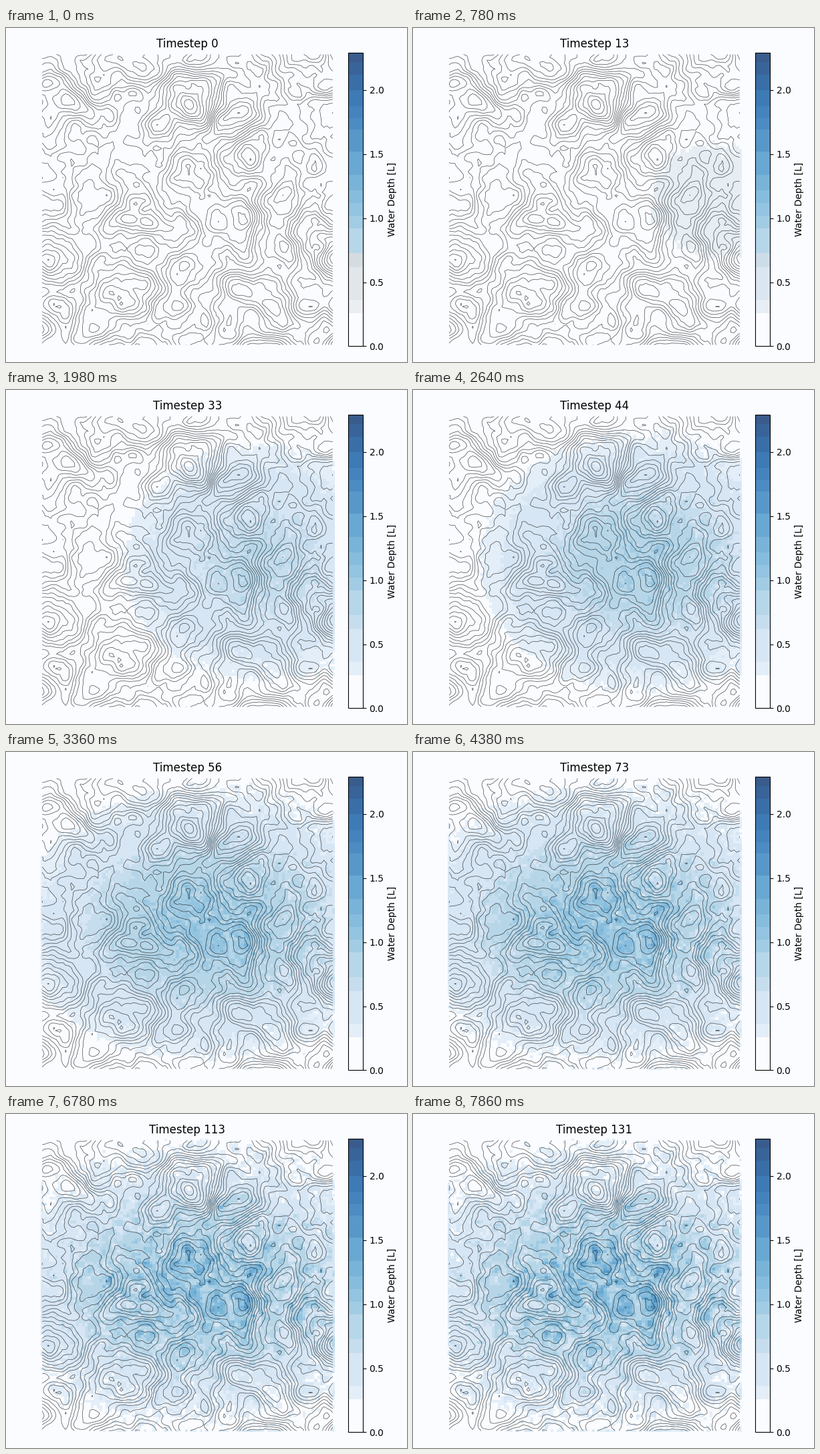
These frames come from a looping animation (600 px wide and 500 px high, 7920 ms). A matplotlib script:

```python
import matplotlib.pyplot as plt
import numpy as np
from matplotlib.animation import FuncAnimation
from matplotlib.colors import ListedColormap

N, STEPS, INTERVAL = 100, 132, 60
VMAX = 2.29
PAPER = "#fafcff"
LEFT, TOP, CELL = 50, 35, 4.42
rng = np.random.default_rng(7)

# main pits and hills: x, y on the stage, height in contour steps
LANDMARKS = np.array([
    (359, 272, -6.0), (268, 232, -5.0), (327, 146, -5.0), (340, 95, -4.0),
    (489, 330, -9.0), (52, 325, -6.0), (128, 260, -4.0), (210, 250, 1.5),
    (190, 38, -6.0), (290, 38, -5.0), (275, 92, 4.5), (168, 410, 5.5),
    (405, 320, 3.0), (330, 404, 2.8), (390, 438, 2.7), (415, 198, 1.8),
    (435, 50, 4.0), (270, 390, -2.6), (55, 130, 4.0), (395, 474, -4.0),
])

# a storm that crosses from right to left, then stops
SIGMA, START, SPEED, RAIN_END, RATE = 121, 490, 6.8, 60, 0.026
MIDDLE = 258
FLOW = 0.007

centres = CELL * (np.arange(N) + 0.5)
X, Y = np.meshgrid(LEFT + centres, TOP + centres)


def fractal(spread, slope=2.5, bend=3):
    """Seeded random surface with a power-law spectrum."""
    f = np.fft.fftfreq(N) * N
    k2 = f[:, None] ** 2 + f**2
    gain = (k2 + bend**2) ** (-slope / 2)
    gain[0, 0] = 0
    field = np.fft.ifft2(np.fft.fft2(rng.normal(size=(N, N))) * gain).real
    return spread * field / field.std()


def pin(field, reach=32):
    """Bend the surface smoothly so that it passes through the landmarks."""
    px, py, height = LANDMARKS.T

    def kernel(x, y):
        r2 = (x[..., None] - px) ** 2 + (y[..., None] - py) ** 2
        return np.exp(-r2 / (2 * reach**2))

    col = ((px - LEFT) / CELL).astype(int)
    row = ((py - TOP) / CELL).astype(int)
    weights = np.linalg.solve(kernel(px, py), height - field[row, col])
    return field + kernel(X, Y) @ weights


ground = pin(fractal(2.3))
looseness = rng.uniform(0.2, 1.8, (N, N))


def run_down(depth, surface, loose):
    """Move a little water between neighbouring rows, towards the lower one."""
    drop = np.diff(surface, axis=0)
    mobile = depth * loose
    flux = FLOW * np.clip(drop, -1, 1) * np.where(drop > 0, mobile[1:], mobile[:-1])
    depth[1:] -= flux
    depth[:-1] += flux


def simulate():
    depth = np.zeros((N, N))
    history = [depth.copy()]
    for step in range(1, STEPS):
        if step <= RAIN_END:
            storm = START - SPEED * (step - 0.5)
            r2 = (X - storm) ** 2 + (Y - MIDDLE) ** 2
            depth += RATE * np.exp(-r2 / (2 * SIGMA**2))
        surface = ground + depth
        run_down(depth, surface, looseness)
        run_down(depth.T, surface.T, looseness.T)
        history.append(depth.copy())
    return history


EDGES = np.array([0, 0.26, 0.36, 0.62, 0.725, 0.92, 1.02, 1.12, 1.22, 1.34,
                  1.52, 1.69, 1.78, 1.875, 2.0, 2.12, 2.22, VMAX])


def palette(t):
    """Banded blues whose palest bands start out grey."""
    mids = (EDGES[1:] + EDGES[:-1]) / 2
    bands = 0.8 * plt.get_cmap("Blues")(mids / VMAX)[:, :3] + 0.2
    grey = 0.7 * max(0, 1 - t / 24)
    pale = bands[1:4]
    bands[1:4] += grey * (pale.mean(axis=1, keepdims=True) - pale)
    bands[0] = plt.matplotlib.colors.to_rgb(PAPER)
    values = (np.arange(458) + 0.5) / 458 * VMAX
    return ListedColormap(bands[np.digitize(values, EDGES[1:-1])])


history = simulate()

fig, ax = plt.subplots(figsize=(6, 5), dpi=100, facecolor=PAPER)
image = ax.imshow(history[0], cmap=palette(0), vmin=0, vmax=VMAX,
                  interpolation="nearest")
ax.contour(ground, levels=np.arange(-12.5, 12), colors="k", linewidths=0.5,
           linestyles="solid", alpha=0.7)
ax.set_xlim(-0.5, N - 0.5)
ax.set_ylim(N - 0.5, -0.5)
ax.axis("off")
title = ax.set_title("Timestep 0")
fig.colorbar(image, ax=ax, fraction=0.046, pad=0.04,
             ticks=np.arange(0, 2.1, 0.5), label="Water Depth [L]")
fig.tight_layout()


def draw(t):
    image.set_data(history[t])
    image.set_cmap(palette(t))
    title.set_text(f"Timestep {t}")
    return image, title


anim = FuncAnimation(fig, draw, frames=STEPS, interval=INTERVAL, repeat=True)
plt.show()
```
